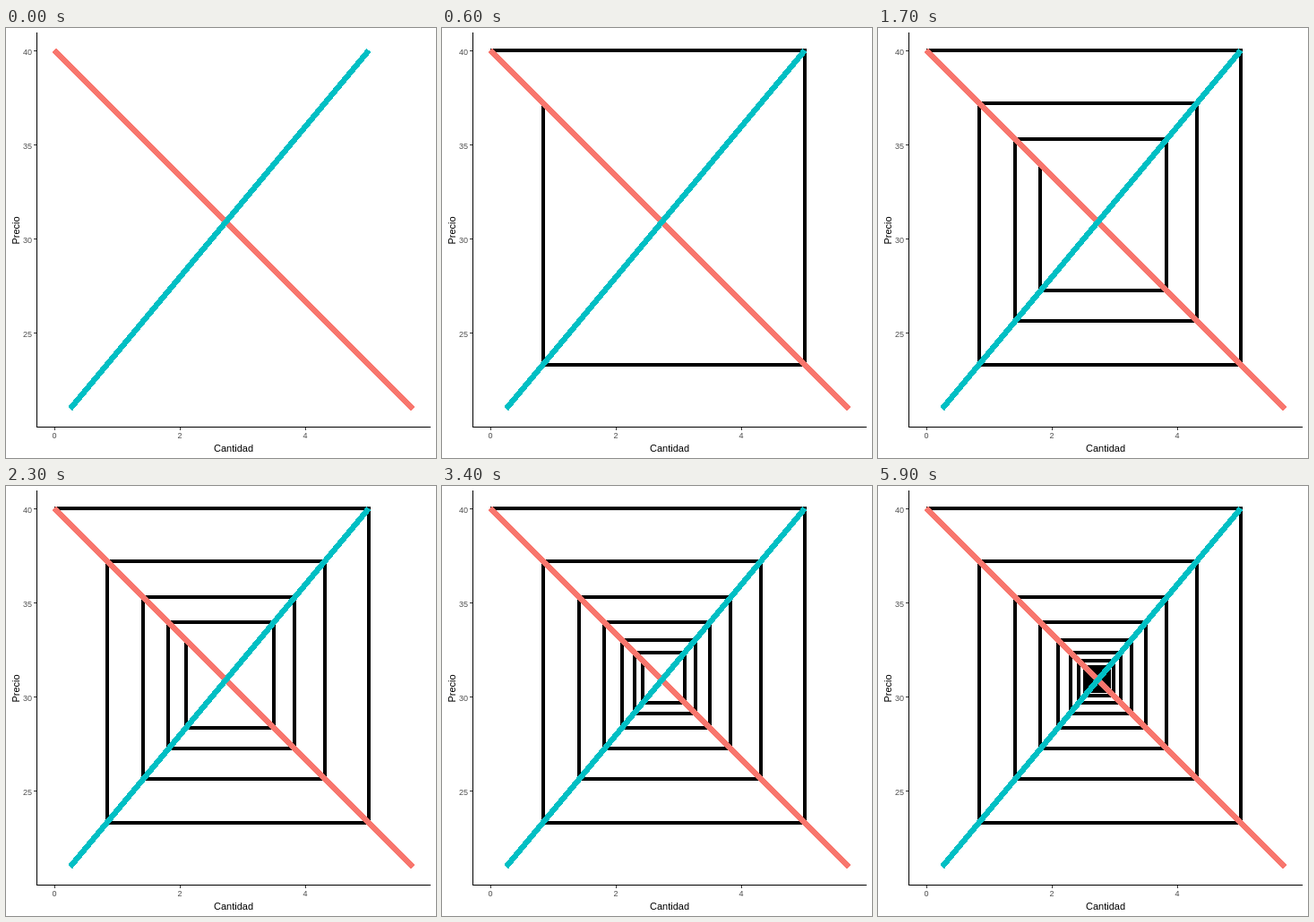
Recreate the animation shown at these times as an HTML page. Size 480 px wide and 480 px high, loop 10000 ms.

```html
<!DOCTYPE html>
<html lang="es">
<head>
<meta charset="utf-8">
<style>
  html, body { margin: 0; width: 100%; height: 100%; overflow: hidden; background: #fff; }
  svg { display: block; width: 480px; height: 480px; font-family: "Liberation Sans", Arial, sans-serif; }
  path { fill: none; shape-rendering: crispEdges; stroke-linejoin: round; }
  .tick { font-size: 9px; fill: #4d4d4d; }
  .title { font-size: 11px; text-anchor: middle; }
</style>
</head>
<body>
<svg viewBox="0 0 480 480">
  <path id="cobweb" stroke="#000" stroke-width="4"/>
  <path id="demand" stroke="#f8766d" stroke-width="6.4"/>
  <path id="supply" stroke="#00bfc4" stroke-width="6.4"/>
  <path d="M34.5 5V445.5H474" stroke="#000"/>
  <path id="ticks" stroke="#333"/>
  <g id="labels"></g>
  <text class="title" x="254" y="473">Cantidad</text>
  <text class="title" transform="translate(15 226) rotate(-90)">Precio</text>
</svg>
<script>
const $ = id => document.getElementById(id);
const toX = q => 54 + 70.2 * q;
const toY = p => 25 + 21.06 * (40 - p);
const pathOf = points => "M" + points.map(([q, p]) => `${toX(q)} ${toY(p)}`).join("L");

const demandPrice = q => 40 - q * 10 / 3;
const supplyQuantity = p => (p - 20) / 4;

$("demand").setAttribute("d", pathOf([[0, 40], [5.7, 21]]));
$("supply").setAttribute("d", pathOf([[0.25, 21], [5, 40]]));

let ticks = "";
function label(text, x, y, anchor) {
  $("labels").innerHTML += `<text class="tick" x="${x}" y="${y}" text-anchor="${anchor}">${text}</text>`;
}
for (const p of [40, 35, 30, 25]) {
  const y = Math.floor(toY(p)) + 0.5;
  ticks += `M31 ${y}h3`;
  label(p, 29, y + 4, "end");
}
for (const q of [0, 2, 4]) {
  const x = Math.floor(toX(q)) + 0.5;
  ticks += `M${x} 446v3`;
  label(q, x - 0.5, 458, "middle");
}
$("ticks").setAttribute("d", ticks);

// Alternate between the supply and demand lines, spiralling to equilibrium.
const SEGMENTS = 69, LAST_STEP = 99;
const corners = [[0, 40]];
while (corners.length <= SEGMENTS) {
  const [q, p] = corners[corners.length - 1];
  corners.push(corners.length % 2 ? [supplyQuantity(p), p] : [q, demandPrice(q)]);
}
// Each corner is reached on a whole step.
const stepOf = i => Math.round(i * LAST_STEP / SEGMENTS);

function cobwebAt(step) {
  const points = corners.filter((_, i) => stepOf(i) <= step);
  const n = points.length;
  if (n < corners.length) {
    const [q0, p0] = corners[n - 1], [q1, p1] = corners[n];
    const k = (step - stepOf(n - 1)) / (stepOf(n) - stepOf(n - 1));
    if (k > 0) points.push([q0 + (q1 - q0) * k, p0 + (p1 - p0) * k]);
  }
  return points.length > 1 ? pathOf(points) : "";
}

function draw() {
  const step = Math.floor(performance.now() % 10000 / 100);
  $("cobweb").setAttribute("d", cobwebAt(step));
  requestAnimationFrame(draw);
}
draw();
</script>
</body>
</html>
```
